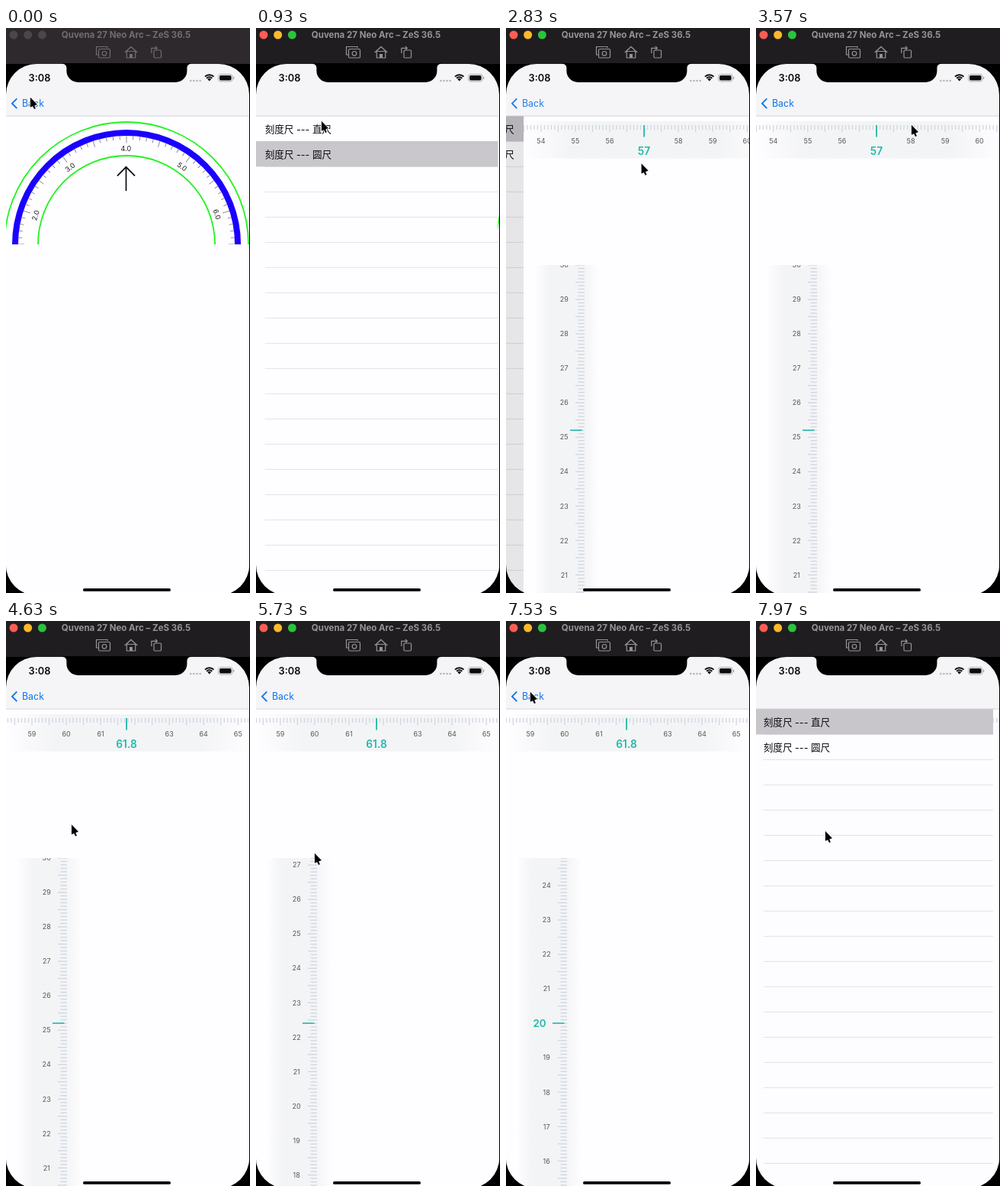
Write an HTML page with a canvas that moves like this. It is 320 px wide and 739 px high and loops after 8 s.

```html
<!DOCTYPE html>
<html lang="en">
<head>
<meta charset="utf-8">
<title>Ruler demo</title>
<style>
html, body { margin: 0; width: 100%; height: 100%; overflow: hidden; background: #000; }
canvas { display: block; width: 320px; height: 739px; }
</style>
</head>
<body>
<canvas id="stage"></canvas>
<script>
const W = 320, H = 739, LOOP = 8000, UNIT = 45.05, ROW = 33, TOP = 115;
const SANS = 'Inter, "Noto Sans CJK SC", "Noto Sans CJK", sans-serif';
const TEAL = '#22b8ab', PAPER = '#fefdff', TICK = '#cdd3e3', INK = '#0b0a0c', BLUE = '#0d74ec';
const POP_DIAL = 430, TAP_ROW = 2240, PUSH_RULER = 2515, SETTLED = 7030, POP_RULER = 7573;
const canvas = document.getElementById('stage');
const c = canvas.getContext('2d');
const dpr = window.devicePixelRatio || 1;
canvas.width = W * dpr;
canvas.height = H * dpr;

// Places where the pointer stops: time, x, y
const STOPS = [
  [0, 32, 91], [930, 86, 122], [1290, 140, 395], [1680, 140, 196], [2230, 120, 134],
  [2400, 166, 200], [3570, 204, 127], [4100, 100, 129], [5000, 78, 346],
  [5330, 77, 430], [5730, 77, 304], [7540, 32, 93], [7970, 91, 275]
];

const unit = k => Math.max(0, Math.min(1, k));
const smooth = k => k * k * (3 - 2 * k);
const glide = (t, start, span) => 1 - (1 - unit((t - start) / span)) ** 3;

function pointer(t) {
  const i = Math.max(1, STOPS.findIndex(stop => stop[0] >= t));
  const [t0, x0, y0] = STOPS[i - 1], [t1, x1, y1] = STOPS[i];
  const e = smooth(unit((t - t0) / (t1 - t0)));
  return [x0 + (x1 - x0) * e, y0 + (y1 - y0) * e];
}

// Critically damped spring from 0 to 1
function spring(t, start) {
  const s = Math.max(0, t - start) * 0.0136;
  return 1 - (1 + s) * Math.exp(-s);
}

function text(s, x, y, size, color, weight = 400, align = 'center') {
  c.font = `${weight} ${size}px ${SANS}`;
  c.fillStyle = color;
  c.textAlign = align;
  c.fillText(s, x, y);
}

function rect(x, y, w, h, color) {
  c.fillStyle = color;
  c.fillRect(x, y, w, h);
}

function box(x, y, w, h, r) {
  c.beginPath();
  c.roundRect(x, y, w, h, r);
}

function fillBox(x, y, w, h, r, color) {
  box(x, y, w, h, r);
  c.fillStyle = color;
  c.fill();
}

function strokeBox(x, y, w, h, r, color, width) {
  box(x, y, w, h, r);
  c.strokeStyle = color;
  c.lineWidth = width;
  c.stroke();
}

function line(points, color, width) {
  c.beginPath();
  for (const [x, y] of points) c.lineTo(x, y);
  c.strokeStyle = color;
  c.lineWidth = width;
  c.stroke();
}

function ring(x, y, r, color, width, from = 0, to = Math.PI * 2) {
  c.beginPath();
  c.arc(x, y, r, from, to);
  c.strokeStyle = color;
  c.lineWidth = width;
  c.stroke();
}

const dot = (x, y, r, color) => fillBox(x - r, y - r, 2 * r, 2 * r, r, color);

// Two arms meeting at a tip
const chevron = (x, y, dx, dy, color, width) =>
  line(dx < dy ? [[x + dx, y - dy], [x, y], [x + dx, y + dy]]
               : [[x - dx, y + dy], [x, y], [x + dx, y + dy]], color, width);

function clipped(x, y, w, h, paint) {
  c.save();
  c.beginPath();
  c.rect(x, y, w, h);
  c.clip();
  paint();
  c.restore();
}

function softBand(x, y, w, h, edge) {
  const g = c.createLinearGradient(x, 0, x + w, 0);
  for (const at of [0, 1]) g.addColorStop(at, '#f3f4f500');
  for (const at of [edge, 1 - edge]) g.addColorStop(at, '#f3f4f5');
  rect(x, y, w, h, g);
}

function windowBar(focused) {
  const ink = focused ? '#979397' : '#716d71';
  rect(0, 0, W, 47, focused ? '#201d20' : '#2d292d');
  ['#ff5c54', '#fdb92b', '#27c53c'].forEach((color, i) =>
    dot(10 + 18.7 * i, 9, 5.5, focused ? color : '#4a464a'));
  text('Quvena 27 Neo Arc – ZeS 36.5', 157.5, 13, 11.5, ink, 700);

  // Camera
  line([[121, 35], [118.5, 35], [118.5, 24.5], [133, 24.5], [133, 26]], ink, 1.2);
  strokeBox(121.5, 27.5, 15, 11.5, 1.5, ink, 1.2);
  ring(129, 33.3, 2.8, ink, 1.2);
  // House
  chevron(164, 24.5, 8.2, 7.5, ink, 1.3);
  strokeBox(158.3, 30.5, 11.4, 8.5, 0, ink, 1.2);
  rect(162, 34, 4, 5, ink);
  // Rotate
  strokeBox(194, 29, 9.5, 10, 1.2, ink, 1.2);
  line([[190.8, 33], [190.8, 26.3], [198, 26.3]], ink, 1.2);
  chevron(198.3, 26.3, -2.5, 2.5, ink, 1.2);
}

function list(x, selected) {
  c.save();
  c.translate(x, 0);
  rect(0, TOP, 2 * W, H, PAPER);
  for (let y = TOP + ROW; y < H; y += ROW) rect(12.5, y - 0.1, 2 * W, 0.8, '#dddce0');
  ['直尺', '圆尺'].forEach((name, i) => {
    if (selected[i]) rect(0, TOP + ROW * i, 2 * W, ROW + 0.4, '#c9c7cc');
    text('刻度尺 --- ' + name, 12.5, 137 + ROW * i, 12.6, INK, 400, 'left');
  });
  c.restore();
}

function dial() {
  clipped(-4, TOP, W + 8, 168, () => {
    c.translate(158, 283);
    for (const r of [160, 116]) ring(0, 0, r, '#20f41c', 1.8);
    ring(0, 0, 146, '#1a00ff', 8);
    for (let n = 15; n <= 65; n++) {
      c.save();
      c.rotate((n - 40) * Math.PI / 50);
      const length = n % 10 === 0 ? 9.5 : n % 5 === 0 ? 8 : 5;
      rect(-0.4, -142, 0.8, length, '#77757a');
      if (n % 10 === 0) text((n / 10).toFixed(1), -0.7, -121.8, 9, '#1a191b');
      c.restore();
    }
  });
  rect(156.7, 182, 1.6, 31, '#000');
  chevron(157.5, 181.8, 11.5, 11.5, '#000', 1.7);
}

// Calls mark(n, offset) for each tenth near the value
function eachTenth(value, mark) {
  for (let n = Math.ceil((value - 5) * 10); n <= (value + 5) * 10; n++) {
    mark(n, (n / 10 - value) * UNIT);
  }
}

function acrossRuler(value) {
  softBand(0, 122, W, 48.5, 0.2);
  eachTenth(value, (n, offset) => {
    const x = 158 + offset;
    rect(x - 0.6, 127, 1.2, n % 5 === 0 ? 9 : 6, TICK);
    if (n % 10 === 0 && Math.abs(offset) > 20) text(n / 10, x, 150.5, 9, '#58595d');
  });
  rect(157.2, 127, 1.8, 15.5, TEAL);
  text(Math.round(value * 10) / 10, 158, 166, 13.8, TEAL, 600);
}

function downRuler(value, settled) {
  clipped(0, 310, W, H, () => {
    softBand(14, 310, 85, H, 0.25);
    eachTenth(value, (n, offset) => {
      const y = 526.2 - offset, x = n % 5 === 0 ? 68 : 71.5;
      rect(x, y - 0.6, 80 - x, 1.2, TICK);
      if (n % 10 === 0 && !(settled && n === value * 10)) text(n / 10, 53.2, y + 3.2, 9, '#58595d');
    });
    rect(61, 525.3, 15.5, 1.6, TEAL);
    if (settled) text(value, 44, 531, 13.4, TEAL, 600);
  });
}

function statusBar() {
  const up = -Math.PI / 2, spread = 0.78;
  text('3:08', 44, 70, 12.8, INK, 600);
  for (let i = 0; i < 4; i++) dot(242.3 + 4.1 * i, 69, 1.3, '#b5b3b7');
  for (const r of [1.7, 5.1, 8.2]) ring(266.7, 69.4, r, INK, r < 2 ? 3.4 : 1.9, up - spread, up + spread);
  strokeBox(278.5, 60.5, 18.5, 9.5, 3, '#a5a3a7', 0.9);
  fillBox(280, 62, 15.5, 6.5, 1.7, INK);
  rect(298, 63.8, 1.2, 3, '#a5a3a7');
}

function navBar(alpha) {
  rect(0, 47, W, TOP - 47, '#f5f4f6');
  rect(0, TOP - 0.4, W, 0.9, '#cfced2');
  statusBar();
  c.globalAlpha = alpha;
  chevron(8, 98.7, 6.3, 6.4, BLUE, 1.9);
  text('Back', 21, 103.3, 12.4, BLUE, 400, 'left');
  c.globalAlpha = 1;
}

function notch() {
  for (const side of [-1, 1]) {
    c.save();
    c.translate(158.4, 47);
    c.scale(side, 1);
    c.beginPath();
    c.moveTo(-0.5, -1);
    c.lineTo(84, -1);
    c.lineTo(84, 0);
    c.arcTo(79, 0, 79, 5, 5);
    c.arcTo(79, 24, 64, 24, 15);
    c.lineTo(-0.5, 24);
    c.fillStyle = '#000';
    c.fill();
    c.restore();
  }
}

function arrowCursor(x, y) {
  c.save();
  c.translate(x, y);
  c.lineJoin = 'round';
  for (const [color, edge] of [['#fff', 1.6], ['#000', 0.2]]) {
    line([[3.4, 9], [5.9, 14.6]], color, 2 + edge);
    line([[0, 0], [0, 12.6], [8.8, 9], [0, 0]], color, edge);
    c.fillStyle = color;
    c.fill();
  }
  c.restore();
}

function page(cover, paint) {
  const x = W * (1 - cover);
  rect(0, TOP, x, H, `rgba(0,0,0,${0.1 * cover})`);
  clipped(x, TOP, W, H, () => {
    c.translate(x, 0);
    rect(0, TOP, W, H, PAPER);
    paint();
  });
}

function draw(t) {
  const onDial = t < TAP_ROW, settled = t >= SETTLED;
  // How far the detail page covers the list
  const cover = onDial ? 1 - spring(t, POP_DIAL) : spring(t, PUSH_RULER) - spring(t, POP_RULER);

  c.setTransform(dpr, 0, 0, dpr, 0, 0);
  rect(0, 0, W, H, '#000');
  windowBar(t >= 120);

  c.save();
  box(0, 47, 319, 695, 40);
  c.clip();
  list(-0.3 * W * cover, [!onDial, t < PUSH_RULER]);
  if (cover > 0.0005) {
    page(cover, onDial ? dial : () => {
      acrossRuler(57 + 4.8 * glide(t, 3640, 1260));
      downRuler(25.2 - 5.2 * glide(t, 5350, SETTLED - 5350), settled);
    });
  }
  navBar(unit(cover * 1.15 - 0.15));
  c.restore();

  notch();
  fillBox(101, 733, 115, 3.8, 1.9, '#000');
  arrowCursor(...pointer(Math.min(t, 7970)));
}

function frame(now) {
  draw(now % LOOP);
  requestAnimationFrame(frame);
}
requestAnimationFrame(frame);
</script>
</body>
</html>
```
